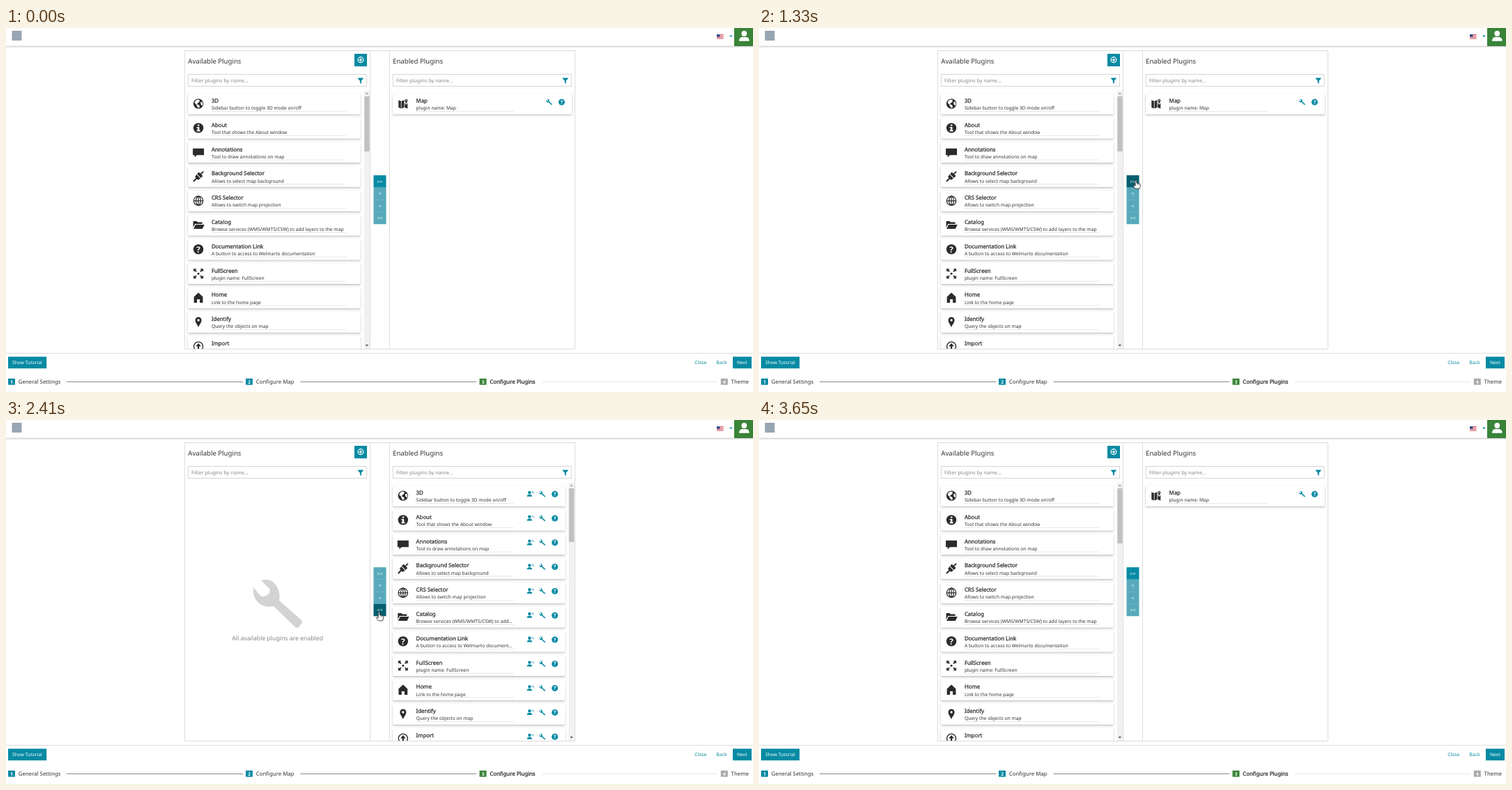
An HTML page for the animation above (4.2 s loop, 1072 by 522 pixels).

```html
<!DOCTYPE html>
<html lang="en">
<head>
<meta charset="utf-8">
<title>Plugin setup</title>
<style>
html, body { margin: 0; width: 100%; height: 100%; overflow: hidden; background: #fff; }
svg { display: block; width: 100%; height: 100%; }
text { font-family: "Noto Sans", "Open Sans", sans-serif; text-rendering: geometricPrecision; white-space: pre; }
.strong { stroke: currentColor; stroke-width: .28px; }
</style>
</head>
<body>
<svg id="stage" viewBox="0 0 1072 522" xmlns="http://www.w3.org/2000/svg"></svg>
<script>
const LOOP = 4200, TICK = 75, PITCH = 34.8;
const TEAL = '#078aa3', DIM = '#57a9bb', HOVER = '#045e6e', PRESS = '#033f4b';
const GREEN = '#398439', INK = '#333', DARK = '#2b2b2b', LINE = '#ddd';

const rect = (x, y, w, h, fill, more = '') =>
  `<rect x="${x}" y="${y}" width="${w}" height="${h}" fill="${fill}" ${more}/>`;
const frame = (x, y, w, h, color = LINE) => rect(x, y, w, h, 'none', `stroke="${color}"`);
const line = (x1, y1, x2, y2, color = LINE, w = 1) =>
  `<path d="M${x1} ${y1}L${x2} ${y2}" stroke="${color}" stroke-width="${w}" fill="none"/>`;
const text = (x, y, size, str, fill = INK, more = '') =>
  `<text x="${x}" y="${y}" font-size="${size}" fill="${fill}" ${more}>${str}</text>`;
const bold = (x, y, size, str, fill = INK) =>
  text(x, y, size, str, fill, `class="strong" color="${fill}"`);
const mid = (x, y, size, str, fill, more = '') =>
  text(x, y, size, str, fill, 'text-anchor="middle" ' + more);
const path = (d, fill = DARK, more = '') => `<path d="${d}" fill="${fill}" ${more}/>`;
const stroke = (d, color, w, more = '') => path(d, 'none', `stroke="${color}" stroke-width="${w}" ${more}`);
const disc = (x, y, r, fill) => `<circle cx="${x}" cy="${y}" r="${r}" fill="${fill}"/>`;
const at = (x, y, body, more = '') => `<g transform="translate(${x} ${y}) ${more}">${body}</g>`;
const group = (id, body, more = '') => `<g id="${id}" ${more}>${body}</g>`;

// Wrench drawn around its centre, 70 units wide
const wrench = (x, y, k, fill) => at(x, y, path(
  'M-24 -33L-11 -20Q-12 -13 -15 -12Q-20 -9 -24 -10L-35 -23C-37 -6 -25 8 -6 4' +
  'L25 34Q28 36 30 34L34 29Q36 26 34 24L2 -4C5 -18 -4 -39 -24 -33Z', fill), `scale(${k})`);
const help = (x, y, r, fill) => disc(x, y, r, fill) +
  mid(x, y + r * .58, r * 1.65, '?', '#fff', 'font-weight="700"');

const iconArt = {
  globe: disc(0, 0, 7.2, DARK) +
    path('M-1 -6L2 -5L1 -2L-1 -1L-2 1L1 2L2 5L0 6.2L-2 4L-3 1L-5.5 -1Q-5 -5 -1 -6ZM3 -2L5.5 -3Q7 0 5.5 3L3.5 1Z', '#fff'),
  info: disc(0, 0, 7.2, DARK) + path('M-1.2 -5H1.4V-2.8H-1.2ZM-2.4 -1.5H1.4V3.2H2.6V4.9H-2.4V3.2H-1.2V.2H-2.4Z', '#fff'),
  bubble: path('M-7.5 -5.5H7.5Q8 -5.5 8 -5V3.5Q8 4 7.5 4H-2L-5.5 7V4H-7.5Q-8 4 -8 3.5V-5Q-8 -5.5 -7.5 -5.5Z'),
  plug: `<g transform="rotate(45)">${path('M-.9 -10H.9V-5H4V-1.2H-4V-5H-.9ZM-4 -.2H4L3 4H1V10H-1V4H-3Z')}</g>`,
  net: stroke('M-6.7 0A6.7 6.7 0 1 0 6.7 0A6.7 6.7 0 1 0 -6.7 0H6.7M0 -6.7V6.7M0 -6.7C-4.5 -4 -4.5 4 0 6.7C4.5 4 4.5 -4 0 -6.7', DARK, 1.2),
  folder: path('M-7.5 3.5V-5.5H-2.5L-1 -4H5.5V-1.6H-4.8ZM-4 -.7H8.7L5.8 5.3H-7Z'),
  ask: help(0, 0, 7.2, DARK),
  full: disc(0, 0, 1.5, DARK) + [0, 90, 180, 270].map(a =>
    `<g transform="rotate(${a})">${path('M-7 -7H-2.6L-4 -5.4L-2.2 -3.5L-3.5 -2.2L-5.4 -4L-7 -2.6Z')}</g>`).join(''),
  home: path('M0 -7.5L6.4 -1.5V7H2V2H-2V7H-6.4V-1.5Z'),
  pin: path('M0 7.5C-1.3 3.5 -4.5 1 -4.5 -2.8A4.5 4.5 0 0 1 4.5 -2.8C4.5 1 1.3 3.5 0 7.5Z') + disc(0, -2.8, 1.7, '#fff'),
  up: stroke('M-6.5 0A6.5 6.5 0 1 0 6.5 0A6.5 6.5 0 1 0 -6.5 0', DARK, 1.3) + path('M0 -4.5L3.8 0H1.1V4H-1.1V0H-3.8Z'),
  map: path('M-6.5 -5L-3 -3.8V7L-6.5 5.5ZM-2.2 -3.8L1.6 -5V5.5L-2.2 7ZM2.4 -1L4.5 1.5L6.5 -1V7L2.4 5.5Z') +
    path('M4.5 .2L2.6 -3.8A2 2.2 0 1 1 6.4 -3.8Z') + disc(4.5, -4.6, .8, '#fff')
};

// icon, title, description, shortened description
const plugins = [
  ['globe', '3D', 'Sidebar button to toggle 3D mode on/off'],
  ['info', 'About', 'Tool that shows the About window'],
  ['bubble', 'Annotations', 'Tool to draw annotations on map'],
  ['plug', 'Background Selector', 'Allows to select map background'],
  ['net', 'CRS Selector', 'Allows to switch map projection'],
  ['folder', 'Catalog', 'Browse services (WMS/WMTS/CSW) to add layers to the map', 'Browse services (WMS/WMTS/CSW) to add...'],
  ['ask', 'Documentation Link', 'A button to access to Welmarto documentation', 'A button to access to Welmarto document...'],
  ['full', 'FullScreen', 'plugin name: FullScreen'],
  ['home', 'Home', 'Link to the home page'],
  ['pin', 'Identify', 'Query the objects on map'],
  ['up', 'Import', 'Allows to import vectors (SHP/KML/GeoJSON/GPX) in the map', 'Allows to import vectors (SHP/KML/GPX)...']
];

function card(x, w, i, [icon, title, long], rule) {
  const y = i * PITCH;
  return rect(x, 94 + y, w, 29.4, '#fff', 'filter="url(#lift)"') +
    at(x + 14.8, 108.6 + y, iconArt[icon]) +
    bold(x + 33.6, 106.9 + y, 7.82, title) +
    text(x + 33.6, 117.1 + y, 6.72, long) +
    line(x + 33, 119.5 + y, x + rule, 119.5 + y, '#e2e2e2', .8);
}

function tools(x, y) {
  return wrench(x, y, .125, TEAL) + help(x + 18, y + .2, 4.5, TEAL);
}

function member(x, y) {
  return at(x, y, disc(-1.2, -2, 2.2, TEAL) + path('M-5 3.8Q-5 1.2 -2.5 .8H.1Q2.6 1.2 2.6 3.8Z', TEAL)) +
    wrench(x + 3.8, y - 2.2, .05, TEAL);
}

function scrollbar(x, bottom, thumb) {
  return rect(x, 89.5, 8.5, bottom - 89.5, '#f1f1f1') + rect(x + .6, 98, 7.3, thumb, '#c1c1c1') +
    path(`M${x + 2} 95L${x + 4.2} 92.6L${x + 6.4} 95Z`, '#a3a3a3') +
    path(`M${x + 2} ${bottom - 6}L${x + 4.2} ${bottom - 3.6}L${x + 6.4} ${bottom - 6}Z`, '#505050');
}

const mapItem = ['map', 'Map', 'plugin name: Map'];
const fullList = plugins.map((p, i) => card(261.3, 247.2, i, p, 227)).join('') + scrollbar(513.7, 460, 79);
const enabledList = plugins.map(([icon, title, long, short], i) =>
  card(555, 247.4, i, [icon, title, short || long], 174) +
  member(752.5, 106 + i * PITCH) + tools(769.6, 106 + i * PITCH)).join('') + scrollbar(807.3, 460, 77);

const heading = (x, label) =>
  text(x, 51, 9.6, label) + rect(x + .2, 66.5, 256, 17, '#fff', 'stroke="#d6d6d6"') +
  text(x + 4.8, 78.4, 7.3, 'Filter plugins by name...', '#8a8a8a') +
  at(x + 247.6, 75.5, path('M-3.8 -4H3.8V-3L1 .2V4.5L-1 3V.2L-3.8 -3Z', TEAL));

const step = (x, n, label, color, strong) =>
  rect(x, 502.7, 10, 9, color) + mid(x + 5, 509.6, 6.5, n, '#fff', 'font-weight="700"') +
  (strong ? bold : text)(x + 14.8, 510.2, 7.82, label, INK);

const flag = rect(1020, 9, 9.6, 6.6, '#fff') +
  [0, 2, 4, 6].map(k => rect(1020, 9 + k * .94, 9.6, .94, '#d0434f')).join('') + rect(1020, 9, 4.4, 3.8, '#3c4f8a');

const header = rect(0, 0, 1072, 25.6, '#fff', 'filter="url(#bar)"') +
  rect(8.5, 4, 14, 14, '#98a5b2') + flag + path('M1038 10.7H1042.6L1040.3 13.2Z', TEAL) +
  rect(1045, 0, 27, 26, GREEN) + disc(1059.3, 8, 3.9, '#fff') +
  path('M1052 18.8Q1052 13.8 1056 13H1062.6Q1066.6 13.8 1066.6 18.8Z', '#fff');

const panels = frame(256.5, 32.5, 560, 428) + line(522.5, 32, 522.5, 460) + line(550.5, 32, 550.5, 460) +
  heading(261.3, 'Available Plugins') + heading(555.1, 'Enabled Plugins') +
  rect(500, 37, 18, 18, TEAL) + `<circle cx="509" cy="45.6" r="3.9" fill="none" stroke="#fff" stroke-width="1.3"/>` +
  stroke('M506.8 45.6H511.2M509 43.4V47.8', '#fff', 1.4);

const footer = line(0, 466.5, 1072, 466.5) +
  rect(3, 471.4, 55.2, 16.8, TEAL) + text(9, 482.2, 6.7, 'Show Tutorial', '#fff') +
  text(988.2, 482.2, 6.7, 'Close', TEAL) + text(1019.6, 482.2, 6.7, 'Back', TEAL) +
  rect(1043, 471.4, 27, 16.8, TEAL) + text(1048.9, 482.2, 6.7, 'Next', '#fff') +
  step(3, 1, 'General Settings', TEAL) + line(87, 507.4, 340, 507.4, '#858585') +
  step(344, 2, 'Configure Map', TEAL) + line(422.5, 507.4, 675, 507.4, '#858585') +
  step(679.5, 3, 'Configure Plugins', GREEN, true) + line(769, 507.4, 1021, 507.4, '#e6e6e6') +
  step(1025.8, 4, 'Theme', '#aaa');

const movers = ['&gt;&gt;', '&gt;', '&lt;', '&lt;&lt;'].map((s, i) =>
  rect(527.5, 211.2 + i * 17.5, 18, 17.6, DIM, `id="move${i}"`) +
  mid(536.5, 222.8 + i * 17.5, 7.3, s, '#fff')).join('');

const cursors =
  group('arrow', path('M0 0V9.6L2.2 7.6L3.7 11L5.2 10.3L3.7 7.1H6.8Z', '#fff', 'stroke="#222" stroke-width=".7"')) +
  group('hand', path('M-1 .8Q0 -.5 1 .8V4.4L5 5.2Q6.2 5.6 6.2 7V9.6L5 12.6H-.8L-3.5 8.8Q-4 7.2 -2.6 7.4L-1 8.6Z',
    '#fff', 'stroke="#222" stroke-width=".8"') + stroke('M2.4 5V7.2M4.2 5.4V7.4', '#444', .6)) +
  group('no', disc(0, 0, 4.6, '#fff') + stroke('M-4 0A4 4 0 1 0 4 0A4 4 0 1 0 -4 0M-2.8 -2.8L2.8 2.8', 'currentColor', 1.9));

document.getElementById('stage').innerHTML = `<defs>
  <clipPath id="list">${rect(256, 90, 561, 370)}</clipPath>
  <clipPath id="short">${rect(551, 90, 265, 33.4)}</clipPath>
  <filter id="lift" x="-5%" y="-30%" width="110%" height="180%"><feDropShadow dx="0" dy="1.5" stdDeviation="1.5" flood-opacity=".27"/></filter>
  <filter id="bar" x="0" y="0" width="100%" height="130%"><feDropShadow dx="0" dy=".8" stdDeviation="1" flood-opacity=".35"/></filter>
  </defs>` + header + panels +
  `<g clip-path="url(#list)">` + group('available', fullList) + group('enabled', enabledList) +
  group('mapWide', card(555, 257, 0, mapItem, 174) + tools(779.4, 106)) + '</g>' +
  group('mapNarrow', card(555, 247.4, 0, mapItem, 163) + tools(769.6, 106) + scrollbar(807.3, 123.4, 15), 'clip-path="url(#short)"') +
  group('empty', wrench(390, 263, 1, '#d3d3d3') + mid(389.6, 316, 8.66, 'All available plugins are enabled', '#858585')) +
  movers + group('pointer', cursors) + footerLayer();

function footerLayer() { return ''; }

const stage = document.getElementById('stage');
stage.querySelector('#pointer').insertAdjacentHTML('beforebegin', footer);
const el = id => document.getElementById(id);
const show = (id, on) => el(id).setAttribute('display', on ? 'inline' : 'none');
const mix = (a, b, u) => a + (b - a) * u;

function pointer(t) {
  const tick = from => Math.floor((t - from) / TICK + .001);
  if (t < 100 || t >= 3645) return null;
  if (t < 640) {
    const u = Math.min(tick(100), 6) / 6;
    return ['arrow', mix(1032, 586, u), mix(511, 264, u)];
  }
  if (t < 1560) {
    const left = 1 - Math.min(tick(640) + 1, 7) / 7;
    return [t < 940 ? 'arrow' : 'hand', 541 + 45 * left ** 3, 218 + 46 * left ** 1.3];
  }
  if (t < 2340) return ['no', 541, 224];
  if (t < 2410) return ['no', 544, 250];
  if (t < 2880) return ['hand', 535.3, 275.3];
  if (t < 3420) return ['no', 535.3, 275.3];
  const u = (tick(3420) + 1) / 3;
  return ['arrow', mix(535, 862, u), mix(275, 510, u)];
}

function draw(t) {
  const moved = t >= 1880 && t < 2880, settling = t >= 2880 && t < 2960;
  show('available', !moved);
  show('empty', moved);
  show('enabled', moved);
  show('mapNarrow', settling);
  show('mapWide', !moved && !settling);

  const first = moved ? DIM : t < 940 || t >= 2880 ? TEAL : t < 1410 ? HOVER : PRESS;
  const last = !moved ? DIM : t < 2410 ? TEAL : t < 2640 ? HOVER : PRESS;
  el('move0').setAttribute('fill', first);
  el('move3').setAttribute('fill', last);

  const p = pointer(t);
  show('pointer', p);
  if (!p) return;
  for (const kind of ['arrow', 'hand', 'no']) show(kind, kind === p[0]);
  el('pointer').setAttribute('transform', `translate(${p[1]} ${p[2]})`);
  el('pointer').setAttribute('color', t < 2880 ? '#a80f16' : '#cf4c1c');
}

const start = performance.now();
function loop() {
  draw((performance.now() - start) % LOOP);
  requestAnimationFrame(loop);
}
loop();
</script>
</body>
</html>
```
